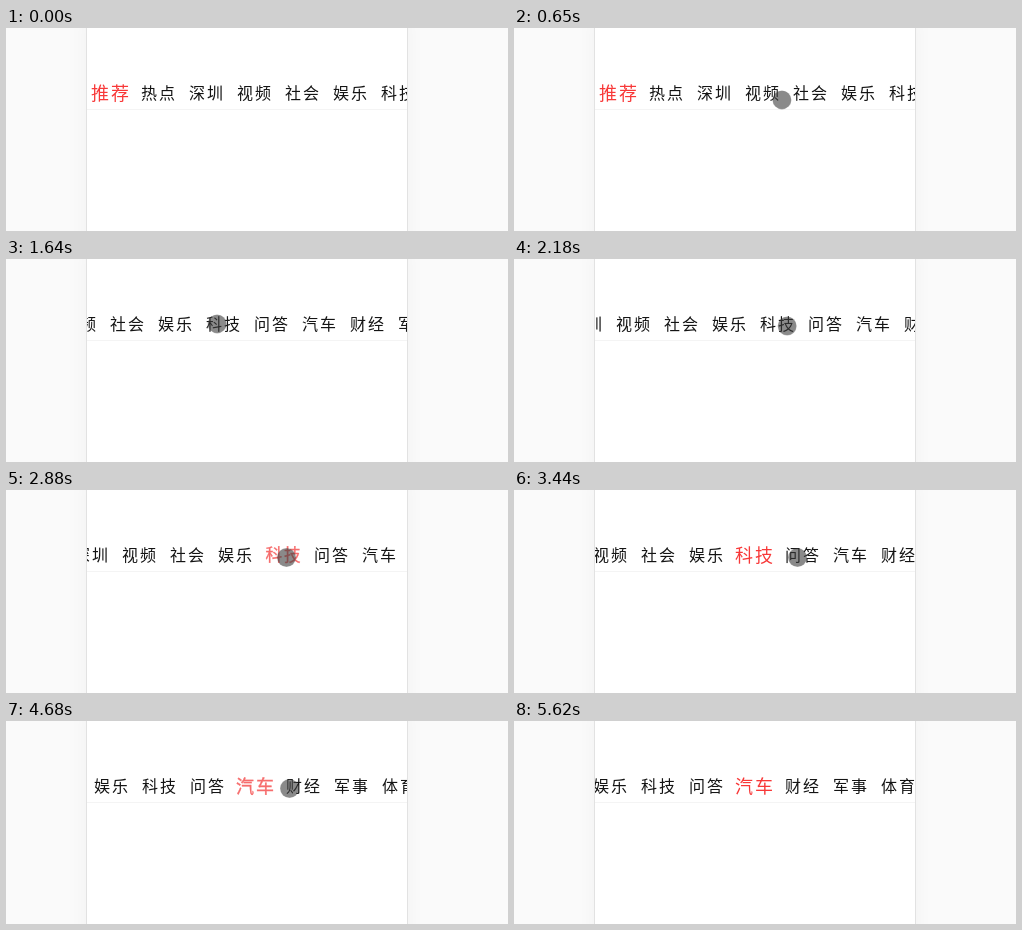
An HTML page for the animation above (6.23 s loop, 502 px wide and 203 px high).

```html
<!DOCTYPE html>
<html lang="zh-CN">
<head>
<meta charset="utf-8">
<style>
html, body { margin: 0; width: 100%; height: 100%; overflow: hidden; background: #fafafa; }
#stage { position: relative; width: 502px; height: 203px; overflow: hidden; }
#phone {
  position: absolute; left: 81px; top: -20px; width: 320px; height: 260px;
  background: #fff; box-shadow: 0 0 0 1px #e2e2e2, 0 6px 20px rgba(0, 0, 0, .04);
}
#nav {
  position: absolute; left: 81px; top: 50px; width: 320px; height: 31px;
  overflow: hidden; border-bottom: 1px solid #f4f4f4;
}
#list {
  display: flex; width: max-content; color: #141414; letter-spacing: 2px;
  font: 300 16px/28px "Noto Sans CJK SC", "Noto Sans CJK", sans-serif;
}
#list span { flex: none; width: 48px; height: 28px; text-align: center; white-space: nowrap; }
#list .on { color: #f83838; font-size: 18px; }
#list .fade { color: #f66c6c; -webkit-text-stroke: .35px #f66c6c; }
#touch {
  position: absolute; left: -9.5px; top: -9.5px; width: 19px; height: 19px;
  border-radius: 50%; background: radial-gradient(circle closest-side, rgba(60, 60, 60, .6) 90%, rgba(60, 60, 60, .4));
}
</style>
</head>
<body>
<div id="stage">
  <div id="phone"></div>
  <div id="nav"><div id="list"></div></div>
  <div id="touch"></div>
</div>
<script>
// The picture advances in even ticks, 80 to a loop
const LOOP = 6230, TICK = LOOP / 80, DELAY = 155;
const list = document.getElementById('list');
const touch = document.getElementById('touch');
const tabs = '推荐 热点 深圳 视频 社会 娱乐 科技 问答 汽车 财经 军事 体育'.split(' ').map(name => {
  const tab = document.createElement('span');
  tab.textContent = name;
  return list.appendChild(tab);
});

const centre = tab => tab * 48 + 24 - 160;

// Pointer poses: tick, x, y
const poses = [
  [0, 395, 198], [7, 262, 66], [9, 281, 66], [11, 281, 65.5], [17, 210, 66], [22, 212, 61],
  [28, 290, 68], [32, 280, 67], [41, 280, 67], [42, 283, 67], [64, 283, 67], [70, 455, 205]
];

// Two swipes, then three taps that centre a tab
const moves = [
  { from: 11, to: 21, x: 190 },
  { from: 22, to: 28, x: 112 },
  { from: 33.5, to: 41, tab: 6 },
  { from: 43.5, to: 50, tab: 7 },
  { from: 53.5, to: 60, tab: 8 }
];

const mix = (a, b, p) => a + (b - a) * p;
const ease = p => p < .5 ? 2 * p * p : 1 - 2 * (1 - p) ** 2;
const part = (k, from, to) => Math.max(0, Math.min(1, (k - from) / (to - from)));

function pointerAt(k) {
  const next = Math.max(1, poses.findIndex(pose => pose[0] > k));
  const a = poses[next - 1], b = poses[next];
  const p = ease(part(k, a[0], b[0]));
  return [mix(a[1], b[1], p), mix(a[2], b[2], p)];
}

function draw(now) {
  const k = Math.floor((now % LOOP - DELAY) / TICK);
  let scroll = 0, active = 0, progress = 1;
  for (const { from, to, x, tab } of moves) {
    if (k < from) break;
    const p = part(k, from, to);
    scroll = mix(scroll, tab ? centre(tab) : x, ease(p));
    if (tab) [active, progress] = [tab, p];
  }
  list.style.transform = `translateX(${-Math.round(scroll)}px)`;

  const size = mix(16, 18, Math.min(1, progress * 1.5));
  tabs.forEach((tab, i) => {
    const on = i === active;
    tab.classList.toggle('on', on);
    tab.classList.toggle('fade', on && progress < 1);
    tab.style.transform = on && size < 18 ? `scale(${size / 18})` : '';
  });

  const visible = k >= 0 && k < 70;
  touch.style.visibility = visible ? 'visible' : 'hidden';
  if (visible) {
    const [x, y] = pointerAt(k);
    touch.style.transform = `translate(${x}px, ${y}px)`;
  }
}

function tick() {
  draw(performance.now());
  requestAnimationFrame(tick);
}
tick();
</script>
</body>
</html>
```
